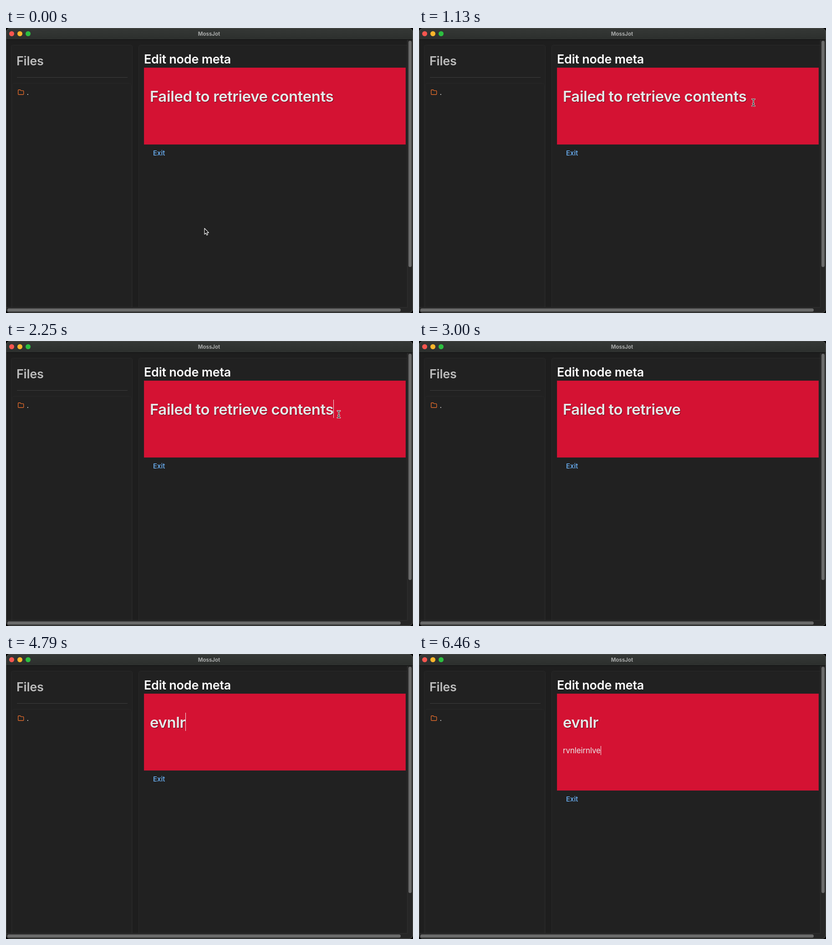
An HTML page for the animation above (6500 ms loop, 894 px wide and 626 px high).

```html
<!DOCTYPE html>
<html lang="en">
<head>
<meta charset="utf-8">
<title>MossJot</title>
<style>
  html, body { margin: 0; width: 100%; height: 100%; overflow: hidden; background: #000; }
  body { position: relative; font-family: Inter, "Open Sans", sans-serif; font-optical-sizing: none; }
  svg { position: absolute; left: 0; top: 0; display: block; }
  .big { font-size: 27px; font-weight: 600; letter-spacing: -.25px; }
  #box {
    position: absolute; left: 303px; top: 87px; width: 575px; height: 169px;
    box-sizing: border-box; background: #d41233; border: 1px solid #bd1433;
  }
  .line { position: absolute; left: 316px; white-space: pre; color: #e8e8e8; }
  #head {
    top: 130px; height: 40px; font-size: 33px; font-weight: 600; line-height: 40px;
    letter-spacing: -.4px; text-shadow: 1px 1px 1px rgba(0, 0, 0, .55);
  }
  #para { top: 202px; height: 20px; font-size: 17px; line-height: 20px; letter-spacing: -.15px; }
  .caret { position: absolute; width: 1px; background: #f0e4e6; }
  #head .caret { top: -1px; height: 40px; }
  #para .caret { top: 0; height: 20px; }
  #exit {
    position: absolute; left: 323px; top: 265px; line-height: 20px;
    font-size: 15px; font-weight: 500; color: #6cb4fb;
  }
</style>
</head>
<body>
<svg width="894" height="626" viewBox="0 0 894 626">
  <defs>
    <linearGradient id="bar" x2="0" y2="1">
      <stop stop-color="#353836"/><stop offset="1" stop-color="#2c2f2d"/>
    </linearGradient>
    <clipPath id="win"><rect width="894" height="626" rx="9"/></clipPath>
  </defs>
  <g clip-path="url(#win)">
    <rect width="894" height="626" fill="#1e1e1e"/>
    <rect width="894" height="25" fill="url(#bar)"/>
    <rect y="25" width="894" height="1" fill="#0c0c0c"/>
    <g fill="#212121" stroke="#292929">
      <rect x="11.5" y="37.5" width="266" height="600" rx="4"/>
      <rect x="13.5" y="121.5" width="262" height="600" rx="4" stroke="#272727"/>
      <rect x="291.5" y="37.5" width="620" height="600" rx="4"/>
    </g>
    <path d="M24 108.5H267" stroke="#3d3d3d"/>
    <path d="M881 26H894V626H0V613H881Z" fill="#262626"/>
    <path d="M881.5 26V613.5H0" fill="none" stroke="#303030"/>
    <g fill="#6a6a6a">
      <rect x="884" y="28" width="7" height="497" rx="3.5"/>
      <rect x="3" y="616" width="864" height="7" rx="3.5"/>
    </g>
    <circle cx="12.5" cy="12.5" r="5.5" fill="#f6564f"/>
    <circle cx="30.5" cy="12.5" r="5.5" fill="#fbb52b"/>
    <circle cx="48.5" cy="12.5" r="5.5" fill="#2cbf40"/>
  </g>
  <rect x=".5" y=".5" width="893" height="625" rx="9" fill="none" stroke="#505250"/>
  <text x="446" y="16.5" text-anchor="middle" font-size="11.5" font-weight="700" fill="#a7a9a8">MossJot</text>
  <text class="big" x="23" y="82" fill="#bdbdbd">Files</text>
  <text class="big" x="303" y="78" fill="#fff">Edit node meta</text>
  <path d="M28 135.7H31.2L33 137.6H37.4Q38.7 137.6 38.7 138.9V144.9Q38.7 146.2 37.4 146.2H28Q26.7 146.2 26.7 144.9V137Q26.7 135.7 28 135.7Z"
    fill="none" stroke="#df6a2b" stroke-width="1.4" stroke-linejoin="round"/>
  <text x="45.5" y="147" font-size="16" fill="#e0e0e0">.</text>
</svg>

<div id="box"></div>
<div id="head" class="line"><span></span><i class="caret"></i></div>
<div id="para" class="line"><span></span><i class="caret"></i></div>
<div id="exit">Exit</div>

<svg width="894" height="626" viewBox="0 0 894 626">
  <g id="pointer" stroke-linejoin="round">
    <path id="arrow" d="M0 0V13.2L3 10.4L5 15L7.2 14L5.3 9.6H9.4Z" fill="#111" stroke="#fff" stroke-width="1.1"/>
    <g id="beam" fill="none" stroke-linecap="round">
      <path d="M-3-7.5Q0-7.5 0-5.5Q0-7.5 3-7.5M0-5.5V5.5M-3 7.5Q0 7.5 0 5.5Q0 7.5 3 7.5M-1.5 2.5H1.5" stroke="#f4f4f4" stroke-width="2.8"/>
      <path d="M-3-7.5Q0-7.5 0-5.5Q0-7.5 3-7.5M0-5.5V5.5M-3 7.5Q0 7.5 0 5.5Q0 7.5 3 7.5M-1.5 2.5H1.5" stroke="#151515" stroke-width="1.1"/>
    </g>
  </g>
</svg>

<script>
const LOOP = 6500, CLICK = 1900, HIDE = 2480, ENTER = 5220;
const $ = id => document.getElementById(id);

// Each edit: [time, heading, paragraph]; a null paragraph does not exist yet.
const edits = [
  [0, 'Failed to retrieve contents', null],
  [CLICK, 'Failed to retrieve contents', null],
  [HIDE, 'Failed to retrieve ', null],
  [3400, 'Failed to ', null],
  [3600, 'Failed ', null],
  [3920, '', null]
];
const type = (word, start, gap, row) => {
  for (let i = 1; i <= word.length; i++)
    edits.push([start + (i - 1) * gap, ...row(word.slice(0, i))]);
};
type('evnlr', 4430, 88, s => [s, null]);
edits.push([ENTER, 'evnlr', '']);
type('rvnleirnlve', 5560, 88, s => ['evnlr', s]);

// Pointer path: [time, x, y], eased between stops.
const path = [[0, 436, 440], [50, 436, 440], [660, 735, 164], [1000, 735, 164], [1600, 731, 161], [LOOP, 731, 161]];
const ease = k => k * k * (3 - 2 * k);

function pointerAt(t) {
  const i = path.findIndex(p => p[0] > t);
  const [t0, x0, y0] = path[i - 1], [t1, x1, y1] = path[i];
  const k = ease((t - t0) / (t1 - t0));
  return [x0 + (x1 - x0) * k, y0 + (y1 - y0) * k];
}

function setLine(id, text, caret) {
  const [span, bar] = $(id).children;
  if (span.textContent !== text) span.textContent = text;
  bar.style.visibility = caret ? 'visible' : 'hidden';
}

function draw(t) {
  const [at, head, para] = edits.filter(e => e[0] <= t).pop();
  const blink = t >= CLICK && (t - at) % 1000 < 500;
  const grown = para !== null;
  setLine('head', head, blink && !grown);
  setLine('para', para || '', blink && grown);
  $('box').style.height = (grown ? 213 : 169) + 'px';
  $('exit').style.top = (grown ? 309 : 265) + 'px';

  const [x, y] = pointerAt(t);
  const over = y < 256;
  $('pointer').setAttribute('transform', `translate(${x} ${y})`);
  $('pointer').style.display = t < HIDE ? '' : 'none';
  $('arrow').style.display = over ? 'none' : '';
  $('beam').style.display = over ? '' : 'none';
}

const start = performance.now();
function tick() {
  draw((performance.now() - start) % LOOP);
  requestAnimationFrame(tick);
}
tick();
</script>
</body>
</html>
```
